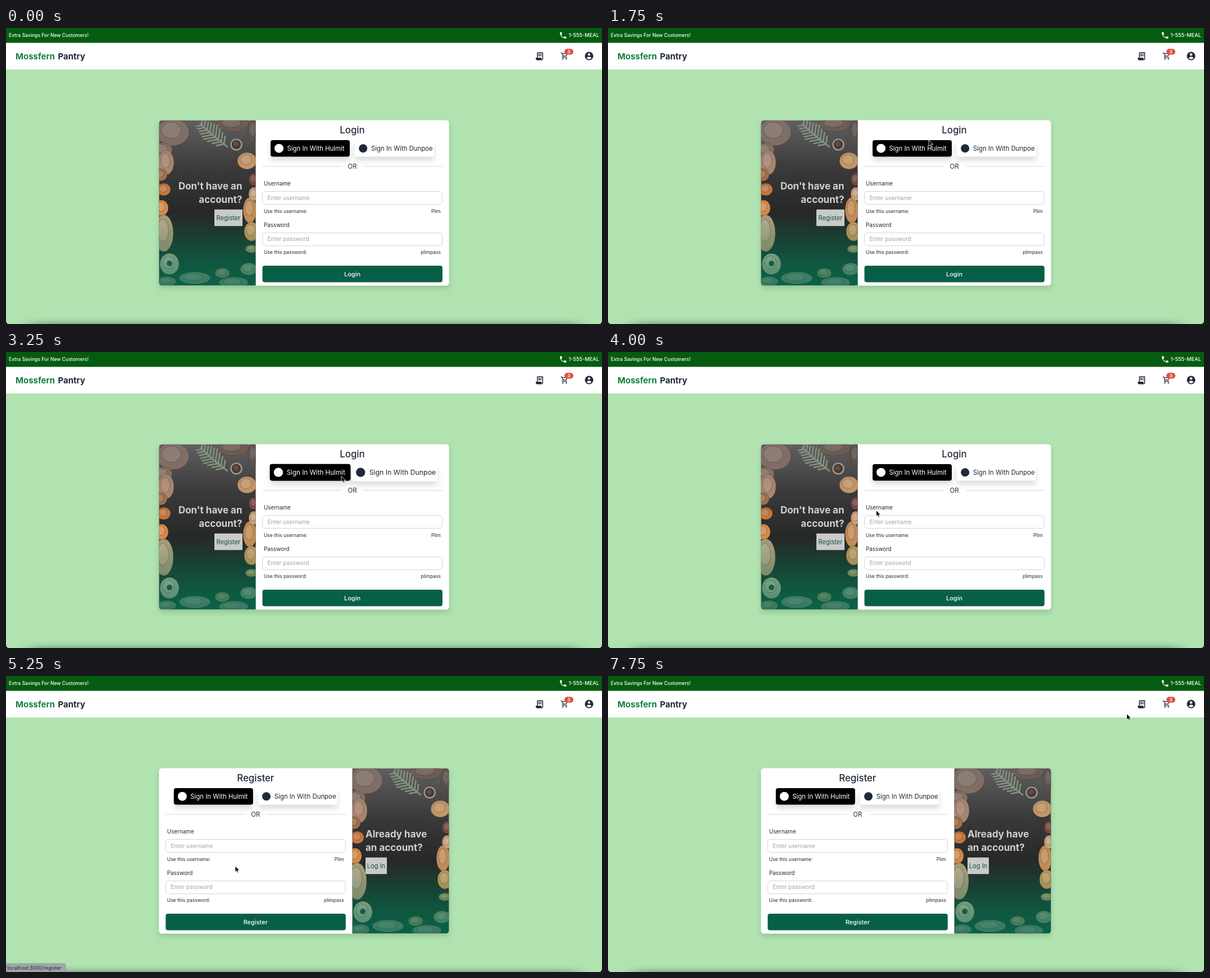
Animation of 1061 by 528 pixels, one loop 8000 ms. Source, as an HTML page:

```html
<!DOCTYPE html>
<html lang="en">
<head>
<meta charset="utf-8">
<title>Sign in</title>
<style>
  html, body { margin: 0; width: 100%; height: 100%; overflow: hidden; background: #b0e3b0; }
  svg { display: block; }
  text { font-family: Inter, "Open Sans", sans-serif; fill: #1f2937; }
  .end { text-anchor: end; }
  .mid { text-anchor: middle; }
  .white { fill: #fff; }
  .top { font-size: 8.6px; font-weight: 500; fill: #fff; }
  .brand { font-size: 15px; font-weight: 700; }
  .title { font-size: 16.8px; font-weight: 500; }
  .btn { font-size: 11.4px; }
  .label { font-size: 9.85px; }
  .hint { font-size: 10.1px; fill: #9ca3af; }
  .help { font-size: 8.5px; }
  .ask { font-size: 17px; font-weight: 700; fill: #d0d1d0; }
  .link { font-size: 11.1px; fill: #14532d; }
  .submit { font-size: 11px; font-weight: 500; fill: #fff; }
  .field { fill: #fff; stroke: #d1d5db; }
  .lift { filter: drop-shadow(0 7px 5px #0002); }
</style>
</head>
<body>
<svg width="1061" height="528" viewBox="0 0 1061 528">
  <defs>
    <clipPath id="cardClip"><rect x="272.3" y="164.5" width="516.4" height="295" rx="5.5"/></clipPath>
    <clipPath id="panelClip"><rect x="272.3" y="164.5" width="172.2" height="295"/></clipPath>
    <linearGradient id="night" x2="0" y2="1">
      <stop offset="0" stop-color="#5f5d5d"/>
      <stop offset=".28" stop-color="#3b3a3b"/>
      <stop offset=".55" stop-color="#272828"/>
      <stop offset=".72" stop-color="#1c3b30"/>
      <stop offset="1" stop-color="#0f6549"/>
    </linearGradient>
    <linearGradient id="tint" x2="0" y2="1">
      <stop offset="0" stop-color="#666" stop-opacity=".3"/>
      <stop offset=".45" stop-color="#333" stop-opacity="0"/>
      <stop offset=".6" stop-color="#065f46" stop-opacity="0"/>
      <stop offset="1" stop-color="#065f46" stop-opacity=".55"/>
    </linearGradient>
    <filter id="soft" x="-10%" y="-300%" width="120%" height="700%"><feGaussianBlur stdDeviation="14 6"/></filter>
  </defs>

  <rect width="1061" height="528" fill="#b0e3b0"/>
  <rect x="45" y="527" width="971" height="14" fill="#123" opacity=".45" filter="url(#soft)"/>
  <path d="M0 522q0 6 6 6H0zM1061 522q0 6-6 6h6z"/>
  <rect width="1061" height="74" fill="#fff"/>
  <rect width="1061" height="26.5" fill="#055c10"/>

  <text class="top" x="5" y="16.3">Extra Savings For New Customers!</text>
  <text class="top end" x="1056" y="16.3" style="font-size:9.2px">1-555-MEAL</text>
  <path class="white" transform="translate(984 5.5) scale(.64)" d="M6.6 10.8c1.4 2.8 3.8 5.1 6.6 6.6l2.2-2.2c.3-.3.7-.4 1-.2 1.1.4 2.3.6 3.6.6.6 0 1 .4 1 1V20c0 .6-.4 1-1 1C10.6 21 3 13.4 3 4c0-.6.5-1 1-1h3.5c.6 0 1 .5 1 1 0 1.3.2 2.5.6 3.6.1.4 0 .7-.2 1z"/>
  <text class="brand" x="17" y="55.6" style="fill:#15803d">Mossfern</text>
  <text class="brand" x="92.5" y="55.6">Pantry</text>

  <g fill="#1f2937" fill-rule="evenodd">
    <path transform="translate(941 41.6) scale(.72)" d="M19.5 3.5L18 2l-1.5 1.5L15 2l-1.5 1.5L12 2l-1.5 1.5L9 2 7.5 3.5 6 2v14H3v3c0 1.7 1.3 3 3 3h12c1.7 0 3-1.3 3-3V2zM19 19c0 .6-.4 1-1 1s-1-.4-1-1v-3H8V5h11zM9 7h6v2H9zM16 7h2v2h-2zM9 10h6v2H9zM16 10h2v2h-2z"/>
    <path transform="translate(987 42.5) scale(.62)" d="M15.5 13c.8 0 1.4-.4 1.8-1l3.6-6.5A1 1 0 0 0 20 4H5.2l-.9-2H1v2h2l3.6 7.6L5.2 14C4.5 15.4 5.5 17 7 17h12v-2H7l1.1-2zM6.2 6h12.1l-2.8 5h-7zM7 18a2 2 0 1 0 0 4 2 2 0 0 0 0-4zM17 18a2 2 0 1 0 0 4 2 2 0 0 0 0-4z"/>
    <circle cx="1038" cy="50" r="7.5"/>
  </g>
  <circle class="white" cx="1038" cy="47.2" r="2.3"/>
  <path class="white" d="M1033.5 53.2q4.5-4 9 0q-4.5 5-9 0z"/>
  <rect x="994" y="37" width="16" height="10.4" rx="5.2" fill="#e0523f"/>
  <text class="mid white" x="1002" y="45.1" font-size="8" font-weight="600">3</text>

  <rect x="272.3" y="164.5" width="516.4" height="295" rx="5.5" fill="#fff" style="filter:drop-shadow(0 5px 5px #0002)"/>
  <g clip-path="url(#cardClip)">
    <g id="photo" clip-path="url(#panelClip)">
      <rect x="272" y="164" width="173" height="296" fill="url(#night)"/>
      <g id="food"></g>
      <g id="fern" fill="none" stroke="#8fa48c" stroke-width="2.6" stroke-linecap="round"></g>
      <rect x="272" y="164" width="173" height="296" fill="url(#tint)"/>
    </g>
  </g>

  <g id="askLogin">
    <text class="ask end" x="420.5" y="288.3">Don't have an</text>
    <text class="ask end" x="420.5" y="312">account?</text>
    <rect x="371" y="323.7" width="50" height="29.5" rx="1" fill="#c9cbca"/>
    <text class="link mid" x="396" y="342.6">Register</text>
  </g>
  <g id="askRegister">
    <text class="ask" x="640" y="288.3">Already have</text>
    <text class="ask" x="640" y="312">an account?</text>
    <rect x="640" y="323.7" width="38" height="29.5" rx="1" fill="#c9cbca"/>
    <text class="link mid" x="659" y="342.6">Log In</text>
  </g>

  <g id="form">
    <text id="title" class="title mid" x="616.5" y="188"></text>
    <g id="darkBtn">
      <rect class="lift" x="471" y="200" width="141" height="29.4" rx="4"/>
      <circle class="white" cx="486" cy="214.7" r="8"/>
      <text class="btn white" x="500.5" y="218.7">Sign In With Hulmit</text>
    </g>
    <g id="lightBtn">
      <rect class="lift" x="621" y="200" width="141" height="29.4" rx="4" fill="#fff"/>
      <circle cx="635.7" cy="214.7" r="7.5" fill="#1f2937"/>
      <text class="btn" x="650" y="218.7">Sign In With Dunpoe</text>
    </g>
    <path d="M456.5 247H597M636.5 247H777" stroke="#d1d5db"/>
    <text class="btn mid" x="616.5" y="251.1">OR</text>
    <text class="label" x="459" y="281.3">Username</text>
    <rect class="field" x="456.5" y="291.5" width="320" height="23" rx="5"/>
    <text class="hint" x="465.5" y="306.6">Enter username</text>
    <text class="help" x="459" y="329.6">Use this username:</text>
    <text class="help end" x="774" y="329.6">Plim</text>
    <text class="label" x="459" y="355">Password</text>
    <rect class="field" x="456.5" y="365.5" width="320" height="23" rx="5"/>
    <text class="hint" x="465.5" y="380.4">Enter password</text>
    <text class="help" x="459" y="403.3">Use this password:</text>
    <text class="help end" x="774" y="403.3">plimpass</text>
    <rect x="456.5" y="424" width="320.5" height="29.5" rx="4" fill="#065f46"/>
    <text id="submit" class="submit mid" x="616.5" y="442.8"></text>
  </g>

  <g id="status">
    <path d="M0 513H103q3 0 3 3V528H0z" fill="#a3a6aa" stroke="#8b9390" stroke-width=".8"/>
    <text x="2.5" y="523.8" font-size="8.7">localhost:3000/register</text>
  </g>
  <path id="cursor" d="M0 0V10.6L2.5 8.4L4.2 12.1L6 11.3L4.3 7.7H7.7Z" stroke="#fff" stroke-width=".8"/>
</svg>
<script>
const el = id => document.getElementById(id);
const LOOP = 8000, STEP = 250, SWITCH = 5250;

// Pastries around the panel edge: x, y, rx, ry, colour
const food = [
  [297, 186, 29, 24, '#8b7468'], [404, 171, 28, 14, '#705a4c'], [440, 184, 10, 20, '#5d5049'],
  [279, 217, 17, 12, '#8f7766'], [285, 240, 14, 22, '#b58d75'], [275, 262, 12, 11, '#a8744e'],
  [281, 288, 12, 11, '#c5783f'], [277, 321, 12, 14, '#d48b4b'], [281, 366, 17, 33, '#a59b78'],
  [429, 237, 17, 15, '#d3a06c'], [441, 270, 9, 11, '#7a4b40'], [434, 325, 12, 23, '#c18c58'],
  [441, 296, 9, 12, '#c9a27c'], [437, 363, 13, 17, '#c39a5e'], [437, 394, 11, 7, '#8f9a63'],
  [291, 421, 17, 19, '#a0b795'], [286, 452, 17, 9, '#709878'], [336, 446, 28, 11, '#6f987c'],
  [385, 437, 13, 9, '#7d9468'], [405, 454, 26, 10, '#6f9a7c'], [432, 430, 15, 11, '#749c7d'],
  [410, 208, 11, 11, '#b5aca4'], [410, 208, 8, 8, '#49352b']
];
const oval = (x, y, rx, ry, style) => `<ellipse cx="${x}" cy="${y}" rx="${rx}" ry="${ry}" ${style}/>`;
el('food').innerHTML = food.map(([x, y, rx, ry, c]) =>
  oval(x, y, rx, ry, `fill="${c}" stroke="#0004"`) +
  oval(x - rx * .1, y - ry * .15, rx * .6, ry * .6, 'fill="#fff2" stroke="#0002" stroke-width="2"')
).join('') + oval(291, 420, 5, 5, 'fill="#24594a"');

let fern = 'M394 212Q368 192 346 171';
for (let i = 0; i < 9; i++) {
  const x = 388 - i * 5, y = 207 - i * 4.2, n = 21 - Math.abs(i - 3) * 2.4;
  fern += `M${x} ${y}l${-n} ${n * .2}M${x} ${y}l${n * .15} ${-n}`;
}
el('fern').innerHTML = `<path d="${fern}"/>`;

// Keys are [time, ...values], joined by straight lines
function at(keys, t) {
  const i = keys.findIndex(k => k[0] > t);
  if (i < 0) return keys[keys.length - 1].slice(1);
  if (!i) return keys[0].slice(1);
  const a = keys[i - 1], b = keys[i], p = (t - a[0]) / (b[0] - a[0]);
  return a.slice(1).map((v, j) => v + (b[j + 1] - v) * p);
}

const path = [
  [1000, 798, 117], [1250, 740, 140], [1750, 571, 200], [2250, 562, 210], [2750, 655, 220],
  [3000, 640, 222], [3250, 597, 221.5], [3500, 570, 222], [3750, 530, 240], [4250, 425, 325],
  [4750, 408, 339], [5250, 408, 339], [5500, 395, 310], [6000, 372, 220], [6250, 400, 222],
  [6500, 475, 226.5], [6750, 520, 222], [7000, 520, 222], [7250, 600, 180], [7500, 800, 90],
  [7750, 923.5, 67.5]
];
const darkScale = [
  [1750, 1], [2250, 1.1], [2500, 1.1], [2750, 1], [3000, 1], [3250, 1.02], [3500, 1.1],
  [4000, 1], [5500, 1], [6000, 1.1], [6500, 1.1], [6750, 1]
];
const lightScale = [
  [2500, 1], [3000, 1.1], [3250, 1.08], [3500, 1], [6500, 1], [7000, 1.1], [7500, 1]
];

const place = (id, x, y = 0) => el(id).setAttribute('transform', `translate(${x} ${y})`);
const show = (id, on) => el(id).style.display = on ? '' : 'none';
const grow = (id, cx, s) =>
  el(id).setAttribute('transform', `translate(${cx} 214.7) scale(${s}) translate(${-cx} -214.7)`);

function draw() {
  const t = Math.floor(performance.now() % LOOP / STEP) * STEP;
  const register = t >= SWITCH;
  place('photo', register ? 344.2 : 0);
  place('form', register ? -172.2 : 0);
  el('title').textContent = el('submit').textContent = register ? 'Register' : 'Login';
  show('askLogin', !register);
  show('askRegister', register);
  show('status', t >= 4500 && t < 5750);
  show('cursor', t >= 750);
  place('cursor', ...at(path, t));
  grow('darkBtn', 541.5, at(darkScale, t)[0]);
  grow('lightBtn', 691.5, at(lightScale, t)[0]);
  requestAnimationFrame(draw);
}
draw();
</script>
</body>
</html>
```
